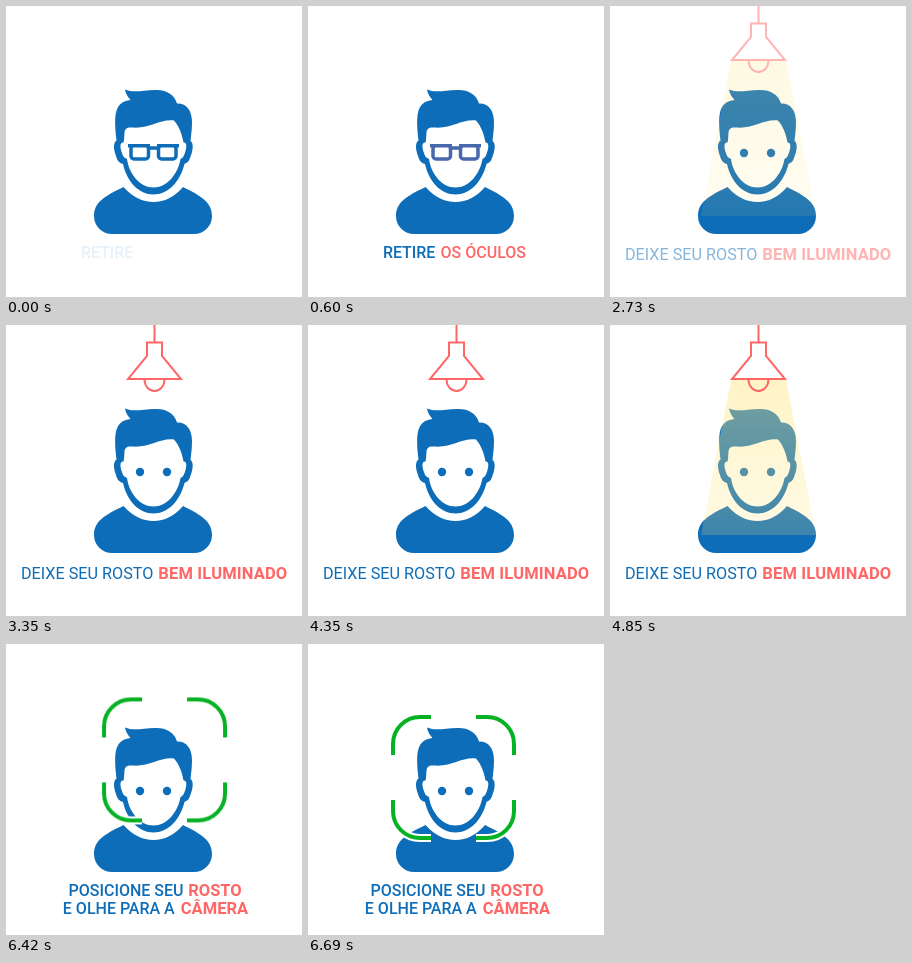
Recreate the animation shown at these times as an HTML page without scripts. Size 296 by 291 pixels, loop 8 s.

```html
<!DOCTYPE html>
<html lang="pt">
<head>
<meta charset="utf-8">
<title>Instruções para a foto</title>
<style>
  html, body { margin: 0; width: 100%; height: 100%; overflow: hidden; background: #fff; }
  svg { display: block; width: 100%; height: 100%; }
  :root { --blue: #0d6db8; --red: #ff6666; }
  text { font: 400 16.2px Roboto, Arial, sans-serif; fill: var(--blue); }
  .medium { font-weight: 500; font-size: 16px; }
  .hot { fill: var(--red); }
  .bold { font-weight: 700; font-size: 16.5px; }
  .person { fill: var(--blue); }
  .lamp { fill: none; stroke: var(--red); stroke-width: 2; }
  .corners { fill: none; stroke: #06b224; stroke-width: 4; }
  .halo { stroke: #fff; stroke-width: 8; }
  .glasses { fill: #fff; stroke: currentColor; stroke-width: 3.5; }

  .anim { animation: 8s linear infinite; }
  .glasses { animation-name: glasses; }
  .first { animation-name: first; }
  .first-a { animation-name: first-a; }
  .first-b { animation-name: first-b; }
  .second { animation-name: second; }
  .light { animation-name: blink; }
  .third { animation-name: third; }
  .corners { animation-name: seek; }

  @keyframes glasses {
    0%, 7.49% { color: #0d6db8; opacity: 1; }
    7.5% { color: #4867ad; }
    10.875% { color: #ff6666; }
    17.125% { opacity: 1; color: #ff6666; animation-timing-function: steps(10, start); }
    20.875%, 100% { opacity: 0; color: #ff6666; }
  }
  @keyframes first {
    0%, 26.74% { opacity: 1; }
    26.75%, 100% { opacity: 0; }
  }
  @keyframes first-a {
    0%, .875% { opacity: .1; }
    3.4%, 100% { opacity: 1; }
  }
  @keyframes first-b {
    0%, 1.6% { opacity: 0; }
    5%, 100% { opacity: 1; }
  }
  @keyframes second {
    0%, 32.99% { opacity: 0; }
    33% { opacity: 0; animation-timing-function: steps(8, start); }
    36%, 73.12% { opacity: 1; }
    73.125%, 100% { opacity: 0; }
  }
  @keyframes blink {
    0%, 41.87% { opacity: 1; }
    41.875%, 48.12% { opacity: 0; }
    48.125%, 54.37% { opacity: 1; }
    54.375%, 60.62% { opacity: 0; }
    60.625%, 66.87% { opacity: 1; }
    66.875%, 100% { opacity: 0; }
  }
  @keyframes third {
    0%, 73.2% { opacity: 0; }
    76.9%, 100% { opacity: 1; }
  }
  @keyframes seek {
    0%, 73.2% { opacity: 0; transform: translate(-20px, 20px); }
    76.9% { opacity: 1; transform: translate(-20px, 20px); }
    81.375% { opacity: 1; transform: translate(24px, -30px); }
    83.625%, 100% { opacity: 1; transform: none; }
  }
</style>
</head>
<body>
<svg viewBox="0 0 296 291">
  <defs>
    <linearGradient id="glow" x2="0" y2="1">
      <stop offset="0" stop-color="#ffe680" stop-opacity=".45"/>
      <stop offset="1" stop-color="#ffe680" stop-opacity=".2"/>
    </linearGradient>
    <path id="corner" d="M123 73H112A27 27 0 0 0 85 100V111"/>
    <g id="frame">
      <use href="#corner"/>
      <use href="#corner" transform="matrix(-1 0 0 1 291 0)"/>
      <use href="#corner" transform="matrix(1 0 0 -1 0 267)"/>
      <use href="#corner" transform="matrix(-1 0 0 -1 291 267)"/>
    </g>
  </defs>

  <g class="person">
    <path fill-rule="evenodd" d="M119 83.500C127 87 136 84.500 149 84C160 83.500 168 88 171 97.500C180 97 186 104 186 116
      C186 124 185 130 184.500 135C188 137 187 145 184 152C183 156 180 157 178.500 158C174 176 162 188.500 147.500 188.500
      C133 188.500 121 176 117 158C113 157 111 154 110 150C107.500 143 107 137 110.500 134.500C108.500 118 108 104 114 98.500
      C117 95.500 121 94.500 124.500 94C122 91 119.500 88 119 83.500Z
      M118.500 127C118 131 118.500 133 117.500 136.500C113.500 136 114 142 116 147C117 151 119 152 121 153
      C123 168 134 181.500 147.500 181.500C161 181.500 172 168 174.500 153C177 152 178.500 149 179.500 145
      C181 140 180.500 136 177.500 136.500C176 128 173 120 168 114.500C153 113 144 123 126 121.500C121 121 118.500 123 118.500 127Z"/>
    <path d="M117.500 181Q131 196 147.500 196Q164 196 177 181C195 190 206 196 206 210A18 18 0 0 1 188 228H106
      A18 18 0 0 1 88 210C88 196 99 190 117.500 181Z"/>
    <circle cx="134" cy="147" r="4.200"/>
    <circle cx="161" cy="147" r="4.200"/>
  </g>

  <g class="anim glasses">
    <path d="M122 139.700H144M151 139.700H173M142 142H153"/>
    <rect x="125" y="139.700" width="17.500" height="13.300" rx="3"/>
    <rect x="152.500" y="139.700" width="17.500" height="13.300" rx="3"/>
  </g>

  <g class="anim first">
    <text class="anim first-a medium" x="74.900" y="252">RETIRE</text>
    <text class="anim first-b medium hot" x="132.500" y="252">OS ÓCULOS</text>
  </g>

  <g class="anim second">
    <path class="anim light" fill="url(#glow)" d="M121 55H176L206 210H91Z"/>
    <path class="lamp" d="M148.500 0V17M141 17.500H156V31L175 54H122L141 31ZM138.500 54.500a10 11.500 0 0 0 20 0"/>
    <text x="15" y="254">DEIXE SEU ROSTO</text>
    <text class="hot bold" x="152.300" y="254" letter-spacing=".15">BEM ILUMINADO</text>
  </g>

  <g class="anim corners">
    <use class="halo" href="#frame"/>
    <use href="#frame"/>
  </g>

  <g class="anim third">
    <text class="medium" x="62.500" y="252">POSICIONE SEU</text>
    <text class="hot bold" x="182.300" y="252">ROSTO</text>
    <text class="medium" x="56.800" y="270">E OLHE PARA A</text>
    <text class="hot bold" x="174.800" y="270">CÂMERA</text>
  </g>
</svg>
</body>
</html>
```
